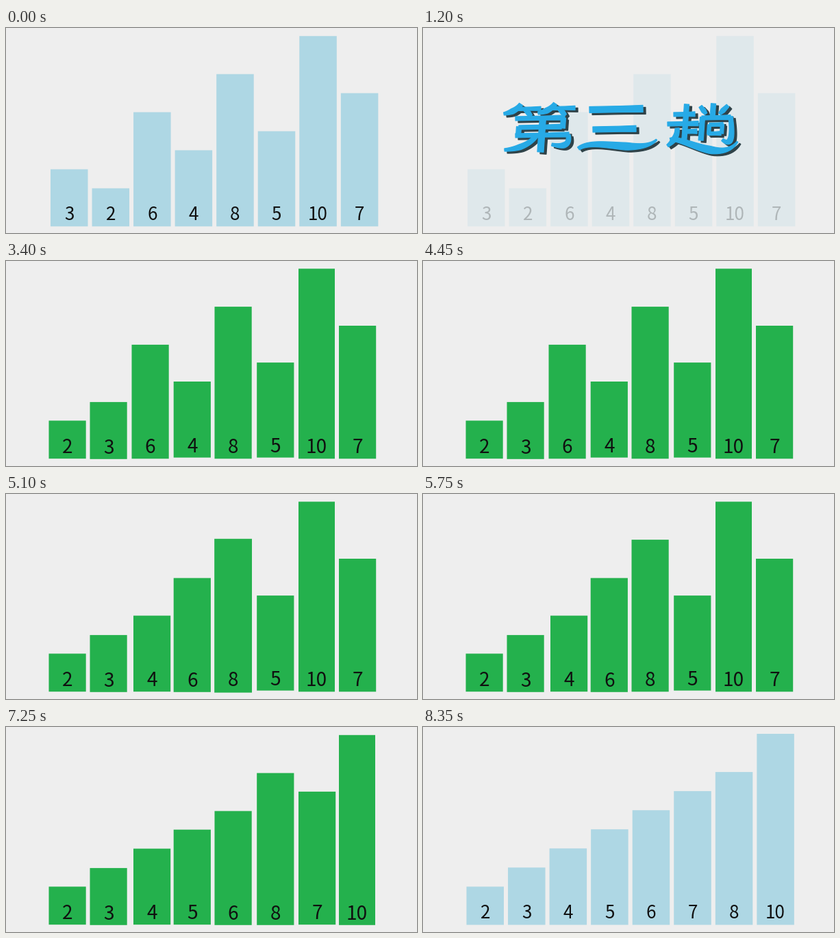
A matplotlib script that plays this animation: 600 px wide and 301 px high, repeating every 8.41 s.

```python
import numpy as np
import matplotlib.pyplot as plt
from matplotlib.animation import FuncAnimation
from matplotlib.patches import Polygon, Rectangle

W, H, DPI = 600, 301, 100
LOOP, FRAMES = 8410, 290
STEP = LOOP // FRAMES

BG = "#eeeeee"
BLUE, GREEN = "#aed7e4", "#24b14d"
INK, SHADE = "#27aae6", "#2f4248"
FONT = "Noto Sans CJK JP"

START = [3, 2, 6, 4, 8, 5, 10, 7]
SLOTS = [62.5, 122.5, 186, 244.7, 304.5, 366.2, 427, 486]

# start ms, end ms, slot whose bar trades places with its right neighbour
SWAPS = [(2750, 3350, 0), (4550, 4950, 2), (5780, 6080, 4),
         (6080, 6360, 3), (6900, 7250, 6), (7250, 7600, 5)]
# value: start ms, end ms of a small swell while it is compared
PULSES = {6: (3600, 4150), 8: (5020, 5450), 10: (6450, 6850)}


def ramp(t, a, b):
    return min(max((t - a) / (b - a), 0.0), 1.0)


def ease(t, a, b):
    p = ramp(t, a, b)
    return p * p * (3 - 2 * p)


fig = plt.figure(figsize=(W / DPI, H / DPI), dpi=DPI, facecolor=BG)
ax = fig.add_axes([0, 0, 1, 1])
ax.set_xlim(0, W)
ax.set_ylim(H, 0)
ax.axis("off")


class Bar:
    def __init__(self, value, x, bottom, color, width, unit, px, lift, z):
        self.value, self.x, self.bottom = value, x, bottom
        self.width, self.height, self.lift = width, unit * value, lift
        self.moves = []
        self.rect = ax.add_patch(Rectangle((0, 0), 1, 1, fc=color, lw=0,
                                           snap=False, zorder=z))
        self.label = ax.text(0, 0, str(value), family=FONT, color="#101010",
                             fontsize=px * 72 / DPI, ha="center",
                             va="baseline", zorder=z + 0.05)
        self.place(x, bottom)

    def place(self, x, bottom, scale=1.0):
        w, h = self.width * scale, self.height * scale
        cx, cy = x + self.width / 2, bottom - self.height / 2
        self.rect.set_bounds(cx - w / 2, cy - h / 2, w, h)
        self.label.set_position((cx, bottom - self.lift))

    def fade(self, alpha):
        for part in (self.rect, self.label):
            part.set_alpha(alpha)
            part.set_visible(alpha > 0)

    def pose(self, t):
        x, bottom = self.x, self.bottom
        for a, b, to_x, to_bottom in self.moves:
            p = ease(t, a, b)
            x += (to_x - x) * p
            bottom += (to_bottom - bottom) * p
        a, b = PULSES.get(self.value, (0, 1))
        self.place(x, bottom, 1 + 0.03 * np.sin(np.pi * ramp(t, a, b)))


def blue_row(values, x0, bottom, unit, z):
    return [Bar(v, x0 + 60.55 * i, bottom, BLUE, 54.5, unit, 26, 9.5, z)
            for i, v in enumerate(values)]


def green_row():
    row = []
    for v, x in zip(START, SLOTS):
        bottom = 288.6 if v in (4, 5) else 290.3
        row.append(Bar(v, x - 2.5 * (v == 6), bottom, GREEN,
                       53 if v == 10 else 54.2, 27.9, 28, 8, 4 - 0.1 * v))
    order = row[:]
    for a, b, k in SWAPS:
        left, right = order[k:k + 2]
        left.moves.append((a, b, SLOTS[k + 1], 290.8))
        right.moves.append((a, b, SLOTS[k], 290.2))
        order[k:k + 2] = right, left
    return row


def brush(points, w0, w1, w2):
    """Outline of a smooth stroke whose width changes along its length."""
    p = np.array(points, float).reshape(-1, 2)
    s = np.linspace(0, 1, 30)
    knots = np.linspace(0, 1, len(p))
    fit = [np.polyfit(knots, p[:, k], len(p) - 1) for k in (0, 1)]
    c = np.column_stack([np.polyval(f, s) for f in fit])
    d = np.column_stack([np.polyval(np.polyder(f), s) for f in fit])
    n = np.column_stack([-d[:, 1], d[:, 0]]) / np.hypot(*d.T)[:, None]
    half = np.interp(s, [0, 0.6, 1], [w0, w1, w2])[:, None] / 2
    return np.vstack([c + n * half, (c - n * half)[::-1]])


def across(x, y, size, w=6):
    return brush((x, y, x + size, y - 0.02 * size), w, w, w + 1)


def down(x, y, size, w=7):
    return brush((x, y, x - 0.07 * size, y + size), w, w, w)


def dot(*points):
    return brush(points, 5, 7, 4)


def sweep(*points):
    return brush(points, 6, 8, 4)


def wave(*points):
    return brush(points, 5, 11, 2)


def ordinal():
    bamboo = [sweep(143, 112, 133, 121, 118, 126),
              across(136, 119, 36, 5), dot(149, 120, 158, 129)]
    return bamboo + [part + (50, -1) for part in bamboo] + [
        across(135, 133, 72), across(140, 146, 62), across(135, 158, 78),
        down(205, 132, 15), down(140, 145, 14), down(175, 131, 51, 9),
        sweep(212, 157, 208, 171, 188, 171),
        sweep(165, 159, 146, 173, 119, 179)]


def three():
    return [across(243, 120, 78, 9), across(248, 149, 63, 8),
            wave(227, 177, 262, 171, 306, 174, 341, 164)]


def trip():
    return [
        across(366, 127, 31), across(357, 141, 45), across(383, 152, 17),
        down(385, 112, 54), sweep(371, 147, 368, 161, 357, 173),
        wave(361, 164, 389, 170, 427, 180, 459, 167),
        down(424, 111, 19), dot(405, 115, 413, 126), dot(445, 114, 433, 126),
        down(408, 131, 34), across(407, 132, 42),
        sweep(449, 130, 449, 163, 437, 164),
        across(418, 142, 20, 5), across(416, 155, 19, 5),
        down(418, 142, 14, 5), down(437, 141, 14, 5)]


def make_title():
    strokes = ordinal() + three() + trip()
    return [ax.add_patch(Polygon(s + shift, fc=color, ec=color, lw=0.9,
                                 joinstyle="round", zorder=z))
            for shift, color, z in (((4, 3), SHADE, 6), ((0, 0), INK, 7))
            for s in strokes]


first = blue_row(START, 65, 291.3, 27.95, 1)
sorting = green_row()
final = blue_row(sorted(START), 63.5, 290.5, 28.05, 5)
title = make_title()


def draw(i):
    t = i * STEP
    show = ramp(t, 30, 850) - ramp(t, 1300, 1850)
    for part in title:
        part.set_alpha(show)
        part.set_visible(show > 0)
    for bar in first:
        bar.fade((1 - 0.77 * show) * (1 - ramp(t, 2000, 2600)))
    for bar in sorting:
        begin = 2030 if bar.value == 3 else 2100
        bar.fade(ramp(t, begin, begin + 630) * (t < 8300))
        bar.pose(t)
    for bar in final:
        bar.fade(ramp(t, 7700, 8300))
    return []


anim = FuncAnimation(fig, draw, frames=FRAMES, init_func=lambda: draw(0),
                     interval=STEP, repeat=True, repeat_delay=0, blit=False)
plt.show()
```
